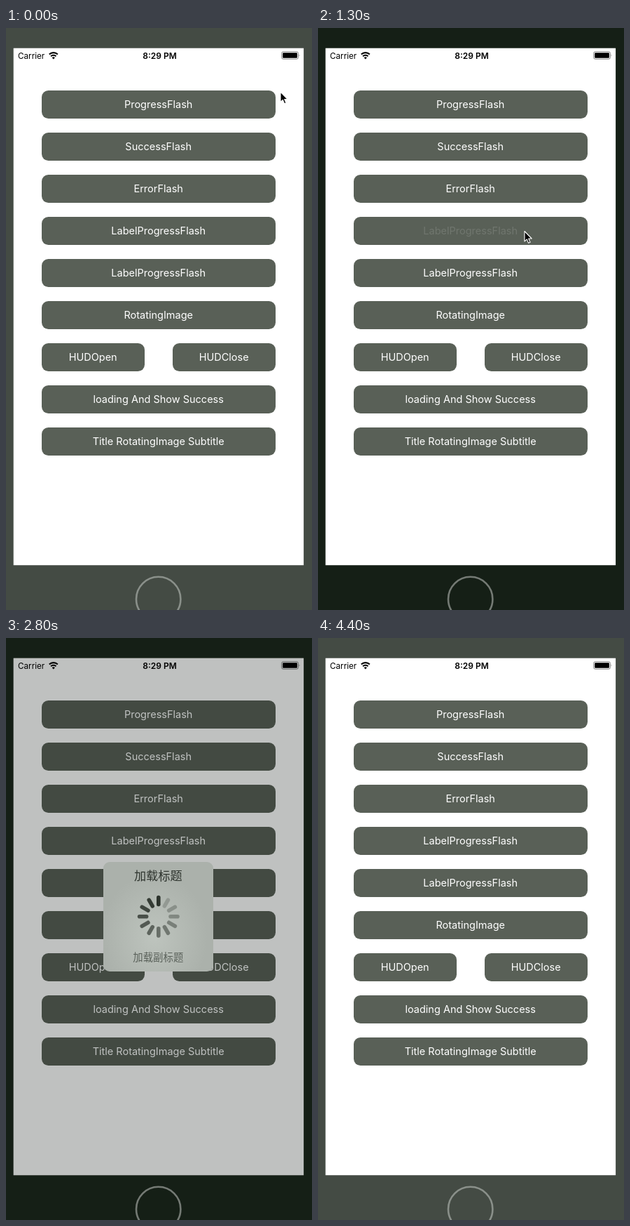
Animation, 437 px wide and 829 px high, one loop 4.5 s. Source, as an HTML page:

```html
<!DOCTYPE html>
<html lang="en">
<head>
<meta charset="utf-8">
<title>HUD demo</title>
<style>
  html, body { margin: 0; width: 100%; height: 100%; overflow: hidden; background: #444b44; }
  svg { display: block; width: 437px; height: 829px; }
  text { font-family: Inter, Roboto, sans-serif; text-anchor: middle; }
  #buttons rect { fill: #596057; }
  #buttons text { fill: #fff; font-size: 14.5px; }
  #hud text { font-family: "Noto Sans CJK SC", "Noto Sans CJK", "Noto Sans", sans-serif; }
</style>
</head>
<body>
<svg viewBox="0 0 437 829">
  <defs>
    <radialGradient id="glow">
      <stop offset="0" stop-color="#cdd4cd" stop-opacity=".55"/>
      <stop offset="1" stop-color="#cdd4cd" stop-opacity="0"/>
    </radialGradient>
    <clipPath id="panelClip"><rect x="139" y="319" width="157" height="156" rx="9"/></clipPath>
  </defs>

  <rect id="bezel" width="437" height="829"/>
  <circle id="home" cx="217.7" cy="813.5" r="31.7" fill="none" stroke-width="2.6"/>
  <rect x="10.7" y="28.7" width="414.4" height="736.5" fill="#fff"/>
  <g id="buttons"></g>
  <rect id="dim" x="10.7" y="28.7" width="414.4" height="736.5" fill="#020a04"/>

  <g id="status">
    <text x="17" y="43.6" font-size="11.7" style="text-anchor:start">Carrier</text>
    <g fill="none" stroke="#000" stroke-width="2.1">
      <path d="M61.8 37.6A8.6 8.6 0 0 1 73.8 37.6"/>
      <path d="M64.1 40.3A5.2 5.2 0 0 1 71.5 40.3"/>
    </g>
    <path d="M65.7 42.2A3 3 0 0 1 69.9 42.2L67.8 44.5Z"/>
    <text x="219.5" y="43.6" font-size="12" font-weight="600">8:29 PM</text>
    <rect x="393.5" y="33.7" width="24" height="10.6" rx="2.6" fill="none" stroke="#000" stroke-opacity=".45"/>
    <rect x="395" y="35.2" width="21" height="7.6" rx="1.3"/>
    <path d="M418.7 37.2Q420.2 39 418.7 40.8Z" fill-opacity=".5"/>
  </g>

  <g id="hud" lang="zh-CN">
    <rect id="panel" x="139" y="319" width="157" height="156" rx="9"/>
    <ellipse cx="212" cy="425" rx="76" ry="90" fill="url(#glow)" clip-path="url(#panelClip)"/>
    <g id="content">
      <text x="217.3" y="344.5" font-size="17.2" font-weight="500" fill="#2f352f">加载标题</text>
      <g id="spinner" stroke="#2c332c" stroke-width="5.6" stroke-linecap="round"></g>
      <text x="217.3" y="460.3" font-size="14.4" fill="#5a615a">加载副标题</text>
    </g>
  </g>

  <path id="cursor" d="M0 0V14.4L3.3 11.4L5.6 16.8L8 15.8L5.7 10.5H10.2Z"
        stroke="#fff" stroke-width="1.1" stroke-linejoin="round"/>
</svg>
<script>
const LOOP = 4500, STEP = 100, SPOKES = 12;
const $ = id => document.getElementById(id);

function add(parent, tag, attrs, text) {
  const el = document.createElementNS("http://www.w3.org/2000/svg", tag);
  for (const key in attrs) el.setAttribute(key, attrs[key]);
  if (text) el.textContent = text;
  parent.append(el);
  return el;
}

const rows = [
  ["ProgressFlash"], ["SuccessFlash"], ["ErrorFlash"], ["LabelProgressFlash"],
  ["LabelProgressFlash"], ["RotatingImage"], ["HUDOpen", "HUDClose"],
  ["loading And Show Success"], ["Title RotatingImage Subtitle"]
];

// Every row shares the same 334 px, with a 40 px gap between its buttons.
const labels = rows.flatMap((row, i) => {
  const y = 89 + i * 60;
  const width = (334 - 40 * (row.length - 1)) / row.length;
  return row.map((label, j) => {
    const x = 51 + j * (width + 40);
    add($("buttons"), "rect", { x, y, width, height: 40, rx: 9.5 });
    return add($("buttons"), "text", { x: x + width / 2 - 0.3, y: y + 25.3 }, label);
  });
});
const pressed = labels[3];

const spokes = Array.from({ length: SPOKES }, (_, i) => add($("spinner"), "line", {
  y1: -17.2, y2: -27.2, transform: `translate(217.8 396.7) rotate(${i * 360 / SPOKES})`
}));

const ramp = (t, from, to) => Math.min(1, Math.max(0, (t - from) / (to - from)));
const ease = u => u * u * (3 - 2 * u);

function draw(t) {
  const dark = t >= 900 && t < 4000;
  $("bezel").setAttribute("fill", dark ? "#151f16" : "#444b44");
  $("home").setAttribute("stroke", dark ? "#747a74" : "#8a908a");

  const dim = .25 * (ramp(t, 1500, 1800) - ramp(t, 3400, 3750));
  const hud = ramp(t, 1500, 1700) - ramp(t, 3400, 3800);
  const shade = Math.round(186 - 60 * dim);
  $("dim").setAttribute("opacity", dim);
  $("hud").setAttribute("opacity", hud);
  $("content").setAttribute("opacity", hud);
  $("panel").setAttribute("fill", `rgb(${shade},${shade + 6},${shade})`);

  pressed.setAttribute("fill-opacity", t < 1300 ? 1 : .14 + .86 * ramp(t, 1600, 1800));

  const head = (t / STEP + 8) % SPOKES;
  spokes.forEach((spoke, i) =>
    spoke.setAttribute("opacity", 1 - .07 * ((head - i + SPOKES) % SPOKES)));

  // The pointer goes to the button, slips off it, then drifts away.
  const go = ease(ramp(t, 0, 600)), slip = ramp(t, 1500, 1700), drift = ramp(t, 1700, 2200);
  const x = 392 - 97 * go + 4 * slip + 40 * drift;
  const y = 91 + 198.5 * go + 20 * slip + 36 * drift;
  $("cursor").setAttribute("transform", `translate(${x} ${y})`);
  $("cursor").setAttribute("visibility", t < 2300 ? "visible" : "hidden");
}

const start = performance.now();
function tick() {
  const t = (performance.now() - start) % LOOP;
  draw(Math.floor(t / STEP) * STEP);
  requestAnimationFrame(tick);
}
tick();
</script>
</body>
</html>
```
